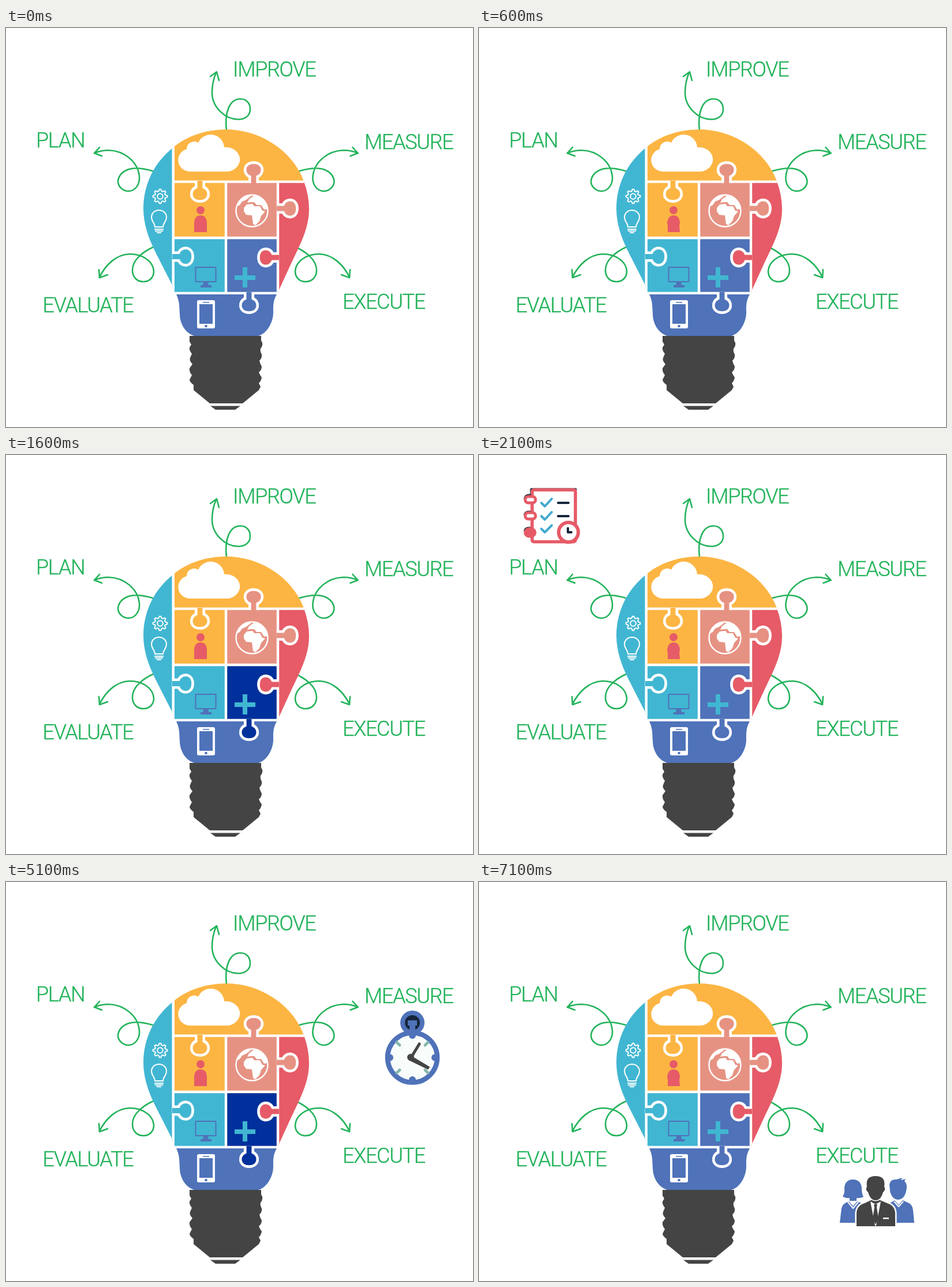
Write an HTML page that moves like this. It is 809 px wide and 692 px high and loops after 8 s.

```html
<!DOCTYPE html>
<html lang="en">
<head>
<meta charset="utf-8">
<title>Improvement cycle</title>
<style>
  html, body { margin: 0; height: 100%; overflow: hidden; background: #fff; }
  svg { display: block; width: 100vw; height: 100vh; }
  text { font: 300 36px Roboto, "Open Sans", sans-serif; letter-spacing: -1.3px; fill: #22b35a; stroke: #22b35a; stroke-width: .4; }
  .line { fill: none; stroke-linecap: round; stroke-linejoin: round; }
  .green { stroke: #22b35a; stroke-width: 2.6; }
  .white { fill: none; stroke: #fff; stroke-width: 2; }
  .gap { fill: none; stroke: #fff; stroke-width: 4.4; }
  .orange { fill: #fcb543; }
  .red { fill: #e65b67; }
  .teal { fill: #41b6d2; }
  .blue, .cell { fill: #4f72b9; }
  .pink { fill: #e69283; }
  .grey { fill: #444; }
  .ink { stroke: #15263a; }
  .icon, .arms { display: none; }
  .hot-red .pink.lit { fill: #e65b67; }
  .hot-blue .cell { fill: #00309b; }
  .hot-orange .body { display: none; }
  .hot-orange .arms { display: inline; }
  .plan #plan, .improve #improve, .measure #measure, .execute #execute { display: inline; }
</style>
</head>
<body>
<svg id="stage" viewBox="0 0 809 692">
  <defs>
    <clipPath id="glass">
      <path d="M382 176C440 176 497 213 516 266Q525 290 525 315C525 350 506 382 490 417L474 452 470 462H294L288 446 260.5 392C251 373 238 345 238 313C238 270 258 232 290 207C312 188 345 176 382 176Z"/>
    </clipPath>
    <path id="tab" stroke="#fff" stroke-width="4.6" d="M-6.7 2V-9C-19 -14 -18 -33.6 0 -33.6C18 -33.6 19 -14 6.7 -9V2"/>
    <g id="upper" class="line green">
      <path d="M257 249C238 243 222 241 210 246C198 251 194 260 194 267C195 277 204 283 213 283C225 282 232 270 231 258C229 232 205 213 178 212Q165 212 153 217"/>
      <path d="M162 207L153 217 166 222"/>
    </g>
    <g id="lower" class="line green">
      <path d="M258 379C240 387 220 401 220 420C220 432 228 440 239 440C250 440 257 432 257 422C256 404 237 392 215 392C192 393 174 410 163 432"/>
      <path d="M162 419L163 433 177 428"/>
    </g>
  </defs>

  <text x="393" y="84">IMPROVE</text>
  <text x="52" y="207">PLAN</text>
  <text x="621" y="210">MEASURE</text>
  <text x="63.5" y="493">EVALUATE</text>
  <text x="583" y="487">EXECUTE</text>

  <g class="line green">
    <path d="M382 178C378 145 388 123 406 123C418 123 423 132 423 141C423 153 413 158.500 402 158.500C380 158 357 138 357 112Q357 94 364 77"/>
    <path d="M354 84L365 76 369 91"/>
  </g>
  <use href="#upper"/>
  <use href="#upper" transform="translate(762.5) scale(-1 1)"/>
  <use href="#lower" x="-1"/>
  <use href="#lower" transform="translate(758) scale(-1 1)"/>

  <g clip-path="url(#glass)">
    <path class="teal" d="M230 170H290V462H230ZM290 364H381V460H290Z"/>
    <path class="orange" d="M290 170H530V267H381V364H290Z"/>
    <path class="pink lit" d="M381 267H471V364H381Z"/>
    <path class="cell" d="M381 364H471V460H381Z"/>
    <path class="red" d="M471 267H530V462H471Z"/>
    <path class="gap" d="M289.7 200V462M381 267V460M471 267V460M290 266.600H530M290 364H471M290 460H471"/>
  </g>
  <path class="blue" d="M295 462H469C462 474 463 484 463 495C462 514 450 531 437 534H326C310 529 301 512 301 496C300 482 301 475 295 462Z"/>
  <use href="#tab" class="orange" transform="translate(336 267) rotate(180)"/>
  <use href="#tab" class="pink lit" transform="translate(429 267)"/>
  <use href="#tab" class="pink lit" transform="translate(471 313) rotate(90)"/>
  <use href="#tab" class="red" transform="translate(471 398) rotate(-90)"/>
  <use href="#tab" class="teal" transform="translate(290 396.5) rotate(90)"/>
  <use href="#tab" class="cell" transform="translate(421 460) rotate(180)"/>

  <path fill="#fff" d="M321 249A21 20 0 0 1 313 210A13 13 0 0 1 333 199A23.500 23.500 0 0 1 378 207A24 21 0 0 1 384 249Z"/>

  <path id="gear" class="white" stroke-linejoin="round"/>
  <circle class="white" cx="267" cy="292" r="4.8"/>
  <path class="white" d="M258 345C258 338 252 336 252 328A13 12 0 0 1 278 328C278 336 272 338 272 345ZM257 349H273M258 352H272M261 355H269"/>

  <g class="red">
    <circle cx="337" cy="316" r="7"/>
    <path class="body" d="M326 354V337Q327 325 337 325T348 337V354Z"/>
    <path class="arms" d="M327 354V343L326 339Q327 325 337 325T348 338L347 343 348 354Z"/>
  </g>

  <circle class="pink" cx="426" cy="317" r="27.5" stroke="#fff" stroke-width="2.4"/>
  <path fill="#fff" d="M412 312L417 306 427 305 430 309 440 309 444 317 449 318 442 326 439 335 432 342 428 340 426 325 416 324 412 318ZM418 303L421 297 429 291 441 293 450 303 453 314 447 315 442 307 434 307 430 302 424 302ZM399 310L406 298 419 290 425 291 416 298 409 301 405 307Z"/>

  <rect class="line" x="328.5" y="415" width="35" height="25" rx="1" stroke="#4f72b9" stroke-width="2"/>
  <path class="blue" d="M342 441H350L351 446H356V450H337V446H341Z"/>
  <path class="teal" d="M410 415H418V429H432V437H418V450H410V437H396V429H410Z"/>

  <rect x="331" y="472" width="31" height="49" rx="3" fill="#fff"/>
  <path class="blue" d="M335 479H358V513H335ZM341 475H352V476.5H341Z"/>
  <circle class="blue" cx="346.5" cy="517" r="2.3"/>

  <path class="grey" d="M318 534H442V542Q447 549 441 556Q440 561 443 566 444 572 439 577 440 582 443 587 443 593 438 597 440 602 443 606 442 612 438 616L441 622 438 628 410 651H353L325 628V619Q318 614 318 610L322 602Q317 596 318 590L323 583Q317 577 319 572L322 565Q317 559 318 554L321 549 318 544ZM354 655.5H406L397 662H363Z"/>

  <g id="plan" class="icon">
    <path class="line ink" stroke-width="5" d="M91 72V60H167"/>
    <rect x="92" y="60.5" width="75" height="90" rx="3" fill="#fff" stroke="#e65b67" stroke-width="5.5"/>
    <g stroke="#e65b67" stroke-width="5">
      <path class="line ink" d="M80 75Q81 70 88 70M80 103Q81 99 88 99M80 131Q81 127 88 127"/>
      <rect x="80" y="72" width="18" height="11" rx="5.5" fill="#fff"/>
      <rect x="80" y="100" width="18" height="11" rx="5.5" fill="#fff"/>
      <rect x="80" y="128" width="17" height="13" rx="6.5" class="red"/>
    </g>
    <path class="line" stroke="#41a9d0" stroke-width="4" d="M108 83L114 89 126 76M108 106L114 112 126 99M108 128L114 134 126 122"/>
    <path class="line ink" stroke-width="4" d="M137 83H155M137 106H155"/>
    <circle cx="155" cy="134" r="17" fill="#fff" stroke="#e65b67" stroke-width="6"/>
    <path class="line ink" stroke-width="4" d="M154 127V134H160"/>
  </g>

  <g id="improve" class="icon">
    <rect x="458.5" y="98.5" width="92" height="92" fill="#fff" stroke="#f1f1f1"/>
    <rect class="orange" x="467" y="138" width="21" height="49" rx="2"/>
    <path fill="#f3d0b0" d="M469 138H477V187H467V140Z"/>
    <rect class="red" x="494" y="143" width="21" height="44" rx="2"/>
    <rect class="teal" x="521" y="122" width="20" height="65" rx="2"/>
    <g class="line ink" stroke-width="4.5">
      <path d="M505 188H544M500 123Q517 116 529 103M518 101H530V112"/>
      <path stroke="#0a319c" d="M465 188H505M482 127Q492 127 502 122"/>
    </g>
  </g>

  <g id="measure" class="icon">
    <circle cx="704" cy="244" r="17" fill="#15263a" stroke="#4f72b9" stroke-width="8"/>
    <path class="blue" d="M696 240H712V249H709V272H699V249H696Z"/>
    <circle cx="704" cy="304.5" r="43" fill="#f8fcfb" stroke="#4f72b9" stroke-width="8.5"/>
    <g class="blue">
      <circle cx="704" cy="266" r="6"/><circle cx="704" cy="343" r="6"/>
      <circle cx="665" cy="304.5" r="6"/><circle cx="743" cy="304.5" r="6"/>
    </g>
    <path class="line" stroke="#85b8ad" stroke-width="5" d="M677 278L682 283M731 278L726 283M677 331L682 326M731 331L726 326"/>
    <path class="line" stroke="#444" stroke-width="5" d="M702 304L716 281"/>
    <path class="grey" stroke="#444" stroke-width="2" stroke-linejoin="round" d="M700 309L703 303 733 321 731 324Z"/>
    <circle class="grey" cx="701" cy="304" r="6"/>
  </g>

  <g id="execute" class="icon">
    <g class="blue">
      <path d="M648 516C659 516 663 524 663 532Q663 540 666 546Q660 549 654 548V553H642V548Q635 549 630 545Q634 540 633 532C633 523 637 516 648 516Z"/>
      <path d="M625 591L628 566Q630 557 641 554L648 562 655 554 666 558V591Z"/>
      <path d="M712 536L711 525Q712 515 723 516L733 513 731 517 739 515 737 519Q743 524 740 536Q737 550 726 551Q715 550 712 536Z"/>
      <path d="M710 591V558L720 552 727 560 734 552 745 557Q751 560 752 570L754 591Z"/>
    </g>
    <path class="white" d="M639 555L648 566 657 555M719 554L727 563 735 554"/>
    <path class="grey" stroke="#fff" stroke-width="5" paint-order="stroke" d="M654 597V574Q655 561 668 557L681 551H693L707 557Q720 561 721 574V597Z"/>
    <path class="grey" stroke="#fff" stroke-width="3" paint-order="stroke" d="M672 528Q669 510 687 510T702 528Q705 534 700 538Q696 552 687 552T674 538Q669 534 672 528Z"/>
    <path fill="#fff" d="M678 554L687 559 696 554 688 596H686ZM700 582H710V584.5H700Z"/>
    <path class="grey" d="M684 559H690L689 564 692 584 687 594 682 584 685 564Z"/>
  </g>
</svg>
<script>
  const LOOP = 8000;
  // Start time in ms, then the lit piece and the visible icon.
  const STEPS = [
    [0, ""],
    [600, "hot-orange"],
    [1100, "hot-red"],
    [1600, "hot-blue"],
    [2100, "hot-orange plan"],
    [3100, "hot-red improve"],
    [5100, "hot-blue measure"],
    [7100, "hot-orange execute"],
  ];
  const stage = document.getElementById("stage");

  function gearPath(cx, cy, teeth, inner, outer) {
    const points = [];
    for (let i = 0; i < teeth * 4; i++) {
      const angle = (i - 0.5) * Math.PI / teeth / 2;
      const r = i % 4 < 2 ? outer : inner;
      points.push([cx + r * Math.sin(angle), cy - r * Math.cos(angle)]);
    }
    return "M" + points.join("L") + "Z";
  }
  document.getElementById("gear").setAttribute("d", gearPath(267, 292, 8, 9.2, 12.4));

  function draw() {
    const time = performance.now() % LOOP;
    const step = STEPS.findLast(([start]) => start <= time);
    stage.setAttribute("class", step[1]);
    requestAnimationFrame(draw);
  }
  draw();
</script>
</body>
</html>
```
